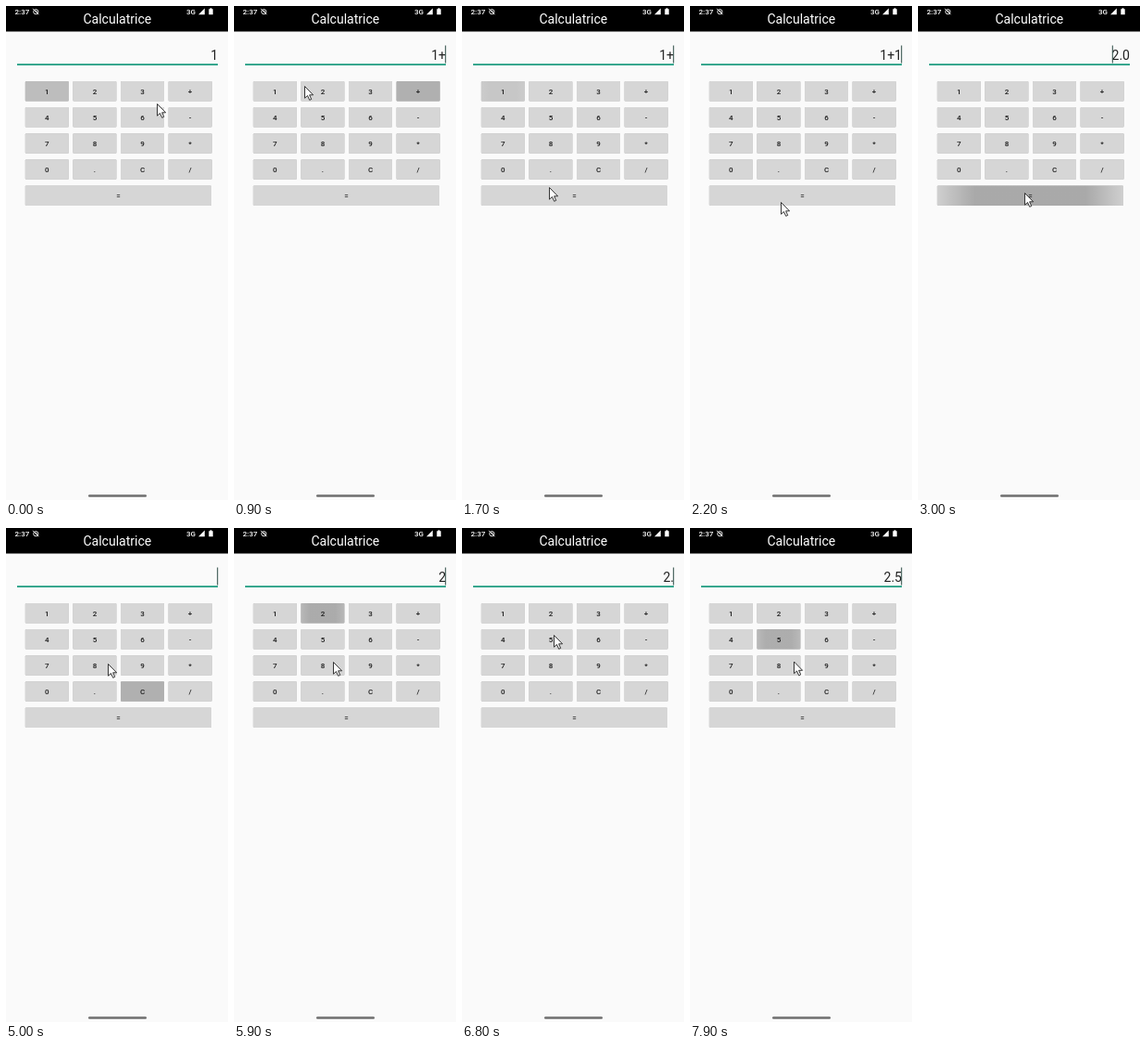
Recreate the animation shown at these times as an HTML page. Size 240x532 px, loop 8000 ms.

```html
<!DOCTYPE html>
<html lang="fr">
<head>
<meta charset="utf-8">
<title>Calculatrice</title>
<style>
html, body { margin: 0; width: 100%; height: 100%; overflow: hidden; background: #fafafa; }
svg { display: block; width: 100vw; height: 100vh; font-family: Roboto, sans-serif; }
.key { fill: #d6d6d6; filter: drop-shadow(0 .7px .7px rgba(0, 0, 0, .28)); }
.label { font-size: 8px; font-weight: 500; text-anchor: middle; fill: #1c1c1c; }
.status { font-size: 8px; font-weight: 500; fill: #fff; }
</style>
</head>
<body>
<svg viewBox="0 0 240 532" preserveAspectRatio="none">
  <defs>
    <linearGradient id="wave">
      <stop offset="0"/><stop offset=".2"/><stop offset=".8"/><stop offset="1"/>
    </linearGradient>
  </defs>
  <rect width="240" height="532" fill="#fafafa"/>
  <rect width="240" height="27.5" fill="#000"/>
  <text class="status" x="9.5" y="9">2:37</text>
  <g fill="none" stroke="#fff" stroke-width=".9">
    <circle cx="32.3" cy="6.2" r="2.6"/>
    <path d="M29 2.8l6.4 6.4M32.3 4.6v1.8h1.5"/>
  </g>
  <text class="status" x="195" y="9">3G</text>
  <path d="M208 9.3h6.8V2.5zM219.3 3.2h1.3v-.9h1.8v.9h1.3v6.1h-4.4z" fill="#fff"/>
  <text x="120.3" y="19" font-size="14" text-anchor="middle" fill="#fff">Calculatrice</text>
  <text id="value" x="229" y="57.7" font-size="14" text-anchor="end" fill="#222"></text>
  <rect id="caret" y="42.5" width="1" height="19" fill="#2b4a44"/>
  <rect x="12" y="62.2" width="217" height="1.7" fill="#17997d"/>
  <g id="keys"></g>
  <rect x="89" y="526.2" width="63" height="2.5" rx="1.2" fill="#6e6e6e"/>
  <path id="pointer" d="M.5.5V13.2L3.5 10.5 5.7 15.3 7.7 14.4 5.6 9.8H9.6Z"
    fill="#fff" stroke="#222" stroke-width=".9" stroke-linejoin="round"/>
</svg>
<script>
const LOOP = 8000, STEP = 100, BLINK = 510;
const $ = id => document.getElementById(id);
const clamp = v => Math.max(0, Math.min(1, v));

function add(parent, tag, attrs, text = '') {
  const node = document.createElementNS('http://www.w3.org/2000/svg', tag);
  for (const name in attrs) node.setAttribute(name, attrs[name]);
  node.textContent = text;
  return parent.appendChild(node);
}

const ripples = {};
function addKey(name, x, y, width) {
  const box = { x, y, width, height: 21.5, rx: 1 };
  add($('keys'), 'rect', { ...box, class: 'key' });
  ripples[name] = add($('keys'), 'rect', { ...box, opacity: 0 });
  add($('keys'), 'text', { x: x + width / 2, y: y + 13.7, class: 'label' }, name);
}
[...'123+456-789*0.C/'].forEach((name, i) =>
  addKey(name, 20.8 + i % 4 * 51.6, 81 + Math.floor(i / 4) * 28.1, 47));
addKey('=', 20.8, 193.4, 201.2);

// [time, display]
const edits = [
  [-520, '1'], [600, '1+'], [1800, '1+1'], [2900, '2.0'],
  [4800, ''], [5800, '2'], [6500, '2.'], [7800, '2.5']
];

// [key, start, fade start, fade end, strength]
const presses = [
  ['1', -500, 400, 700, .117], ['+', 650, 900, 1200, .18], ['1', 1700, 1850, 2150, .18],
  ['=', 2900, 3200, 3500, .21], ['C', 4800, 5000, 5350, .175], ['2', 5800, 6000, 6300, .2],
  ['.', 6500, 6600, 6800, .18], ['5', 7800, 8000, 8300, .19]
];

// [time, x, y] of the pointer tip
const path = [
  [0, 163, 105], [100, 178, 97], [300, 200, 92], [500, 199, 91], [700, 155, 87],
  [900, 76, 86], [1100, 36, 90], [1200, 28, 88], [1300, 28, 88], [1400, 79, 131],
  [1500, 79, 131], [1700, 94, 195], [1900, 98, 211], [2200, 98, 211], [2400, 107, 200],
  [2600, 115, 201], [3900, 115, 201], [4200, 121, 196], [4500, 138, 180], [4700, 141, 174],
  [4800, 134, 165], [5000, 110, 146], [5200, 92, 110], [5500, 78, 91], [5600, 78, 91],
  [5800, 100, 135], [5900, 107, 144], [6200, 97, 172], [6500, 97, 172], [6800, 99, 115],
  [7200, 99, 115], [7600, 112, 180], [7900, 112, 143.5]
];

function pointerAt(t) {
  const i = path.findIndex(p => p[0] >= t);
  if (i <= 0) return path[0].slice(1);
  const [t0, x0, y0] = path[i - 1], [t1, x1, y1] = path[i];
  const k = (t - t0) / (t1 - t0);
  return [x0 + (x1 - x0) * k, y0 + (y1 - y0) * k];
}

const stops = document.querySelectorAll('#wave stop');

function render(t) {
  const [since, text] = edits.filter(e => e[0] <= t).pop();
  $('value').textContent = text;
  $('caret').setAttribute('x', text === '2.0' ? 209.8 : 228.2);
  $('caret').setAttribute('opacity', Math.floor((t - since) / BLINK) % 2 ? 0 : 1);

  for (const name in ripples) ripples[name].setAttribute('opacity', 0);
  for (const [name, start, fade, end, strength] of presses) {
    if (t < start || t >= end) continue;
    const level = clamp((t - start + 60) / 150) * clamp((end - t) / (end - fade));
    const spreading = t - start < 150;
    ripples[name].setAttribute('opacity', level * strength);
    ripples[name].setAttribute('fill', spreading ? 'url(#wave)' : '#000');
    if (spreading) {
      const edge = name === '=' ? .15 : .7;
      stops[0].setAttribute('stop-opacity', edge);
      stops[3].setAttribute('stop-opacity', edge);
    }
  }

  $('pointer').setAttribute('transform', `translate(${pointerAt(t).join(' ')})`);
}

const origin = performance.now();
function tick() {
  const t = (performance.now() - origin) % LOOP;
  render(Math.floor(t / STEP) * STEP);
  requestAnimationFrame(tick);
}
tick();
</script>
</body>
</html>
```
